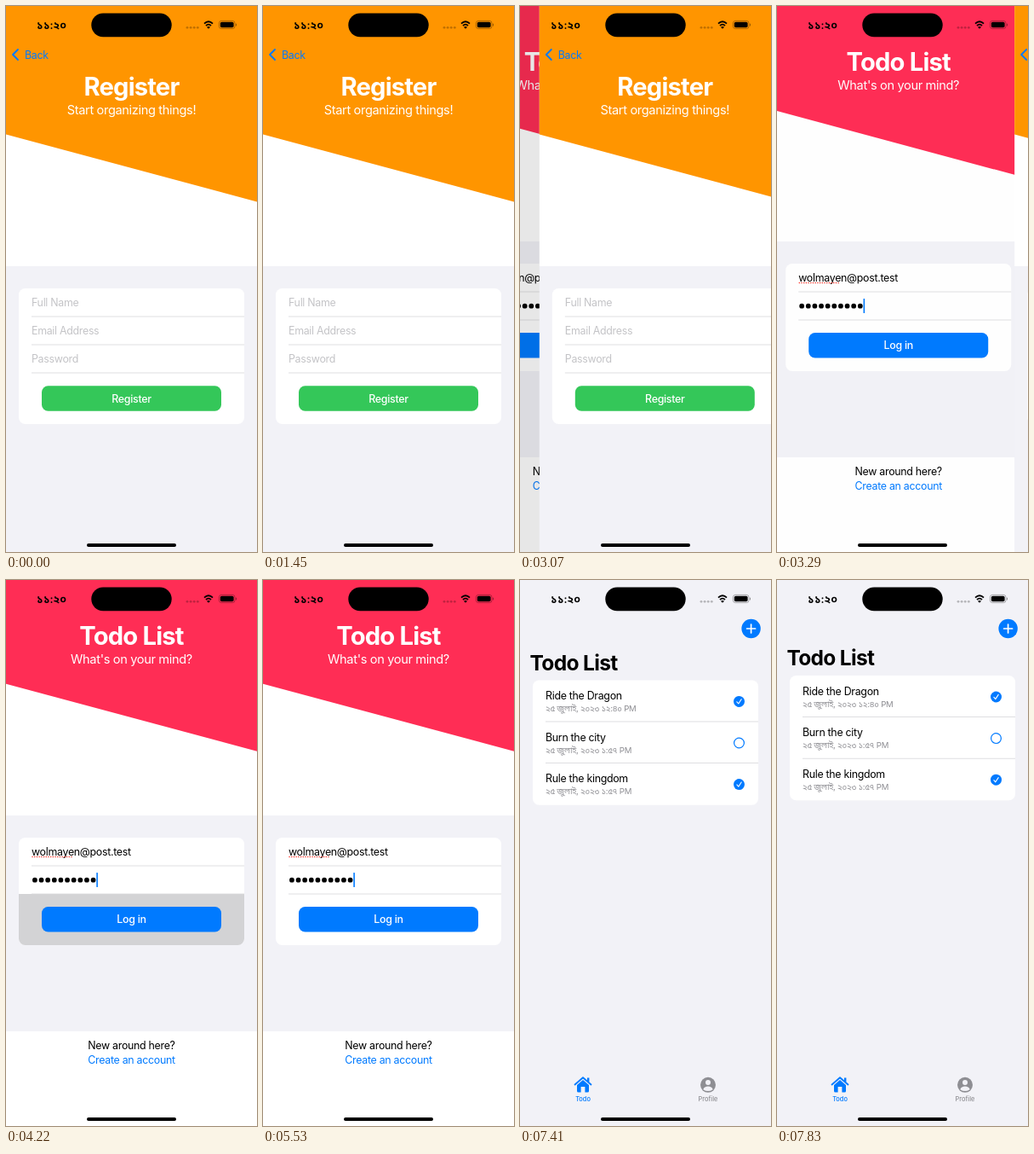
Write an HTML page that moves like this. It is 295x640 px and loops after 8000 ms.

```html
<!DOCTYPE html>
<html lang="en">
<head>
<meta charset="utf-8">
<title>Todo app</title>
<style>
  html, body { margin: 0; width: 100%; height: 100%; overflow: hidden; background: #f2f2f7; }
  svg { display: block; width: 295px; height: 640px; }
  text { font: 400 12.4px Inter, "Noto Sans Bengali", "Noto Sans", sans-serif; letter-spacing: -.024em; }
  .mid { text-anchor: middle; }
  .hero { font-size: 29.2px; font-weight: 700; letter-spacing: -.028em; }
  .sub { font-size: 14.6px; }
  .large { font-size: 24.5px; font-weight: 700; letter-spacing: -.028em; }
  .strong { font-weight: 500; }
  .date { font-size: 9.6px; }
  .tab { font-size: 7.4px; font-weight: 500; letter-spacing: 0; }
  .clock { font-size: 12.6px; font-weight: 600; letter-spacing: 0; }
</style>
</head>
<body>
<svg id="stage" viewBox="0 0 295 640"></svg>
<script>
const BLUE = '#007aff', GRAY = '#8e8e93', PALE = '#f2f2f7';
const LOOP = 8000;

const rect = (x, y, w, h, fill, r = 0, more = '') =>
  `<rect x="${x}" y="${y}" width="${w}" height="${h}" rx="${r}" fill="${fill}" ${more}/>`;
const text = (x, y, str, fill = '#000', cls = '') =>
  `<text x="${x}" y="${y}" fill="${fill}" class="${cls}">${str}</text>`;
const circle = (x, y, r, fill, more = '') =>
  `<circle cx="${x}" cy="${y}" r="${r}" fill="${fill}" ${more}/>`;
const line = (d, color, width, more = '') =>
  `<path d="${d}" fill="none" stroke="${color}" stroke-width="${width}" stroke-linecap="round" stroke-linejoin="round" ${more}/>`;
const divider = y => rect(30, y - .4, 250, .8, '#d6d6da');

const header = (color, edge, y, title, subtitle) =>
  `<path d="M0 0H295V${edge + 79}L0 ${edge}Z" fill="${color}"/>` +
  text(147.5, y, title, '#fff', 'hero mid') +
  text(147.5, y + 21.5, subtitle, '#fff', 'sub mid');

const button = (y, color, label) =>
  rect(42, y, 211, 29.5, color, 7.5) + text(147.5, y + 19.3, label, '#fff', 'strong mid');

function registerPage() {
  const fields = ['Full Name', 'Email Address', 'Password'];
  return rect(0, 0, 295, 305, '#fff') + rect(0, 305, 295, 335, PALE) +
    header('#ff9500', 150.5, 105, 'Register', 'Start organizing things!') +
    `<g id="back">${line('M14 51L8 57L14 63', BLUE, 1.8)}${text(22, 61.5, 'Back', BLUE)}</g>` +
    rect(15, 331, 265, 159, '#fff', 7.5) +
    fields.map((label, i) => text(30, 352.3 + 33 * i, label, '#c4c4c7') + divider(364 + 33 * i)).join('') +
    button(445.3, '#34c759', 'Register');
}

function loginPage() {
  const bullets = Array.from({ length: 10 }, (_, i) => circle(33.9 + 7.63 * i, 351.7, 2.9, '#000')).join('');
  return rect(0, 0, 295, 640, '#fff') + rect(0, 276, 295, 253, PALE) +
    header('#ff2d55', 121.8, 76, 'Todo List', 'What\'s on your mind?') +
    rect(15, 302, 265, 126, '#fff', 7.5) +
    '<path id="press" d="M15 368H280V420.5a7.5 7.5 0 0 1-7.5 7.5H22.5a7.5 7.5 0 0 1-7.5-7.5Z" fill="#d3d3d5"/>' +
    text(30, 323.3, 'wolmayen@post.test') +
    line('M31 324.5H79', '#ff3b30', 1.5, 'stroke-dasharray="0.1 2.6"') +
    divider(335) + divider(368) + bullets +
    rect(106.3, 343, 1.6, 17, BLUE, .6, 'id="caret"') +
    button(383, BLUE, 'Log in') +
    text(147.5, 549.5, 'New around here?', '#000', 'mid') +
    text(147.5, 566.7, 'Create an account', BLUE, 'mid');
}

function todoPage() {
  const tasks = [
    ['Ride the Dragon', '১২:৪০', true],
    ['Burn the city', '১:৫৭', false],
    ['Rule the kingdom', '১:৫৭', true],
  ];
  const row = ([name, time, done], i) => {
    const y = 112 + 48.6 * i;
    const mark = done
      ? circle(257.5, y + 25, 6.5, BLUE) + line(`M254.9 ${y + 25.4}l1.9 2.2l3.4-5.2`, '#fff', 1.1)
      : circle(257.5, y + 25, 5.9, 'none', `stroke="${BLUE}" stroke-width="1.2"`);
    return (i ? divider(y) : '') + text(30, y + 22.6, name) +
      text(30, y + 36.8, `২৫ জুলাই, ২০২৩ ${time} PM`, GRAY, 'date') + mark;
  };
  return rect(0, 0, 295, 640, PALE) +
    circle(271.6, 57, 11.2, BLUE) + line('M266.6 57h10M271.6 52v10', '#fff', 1.7) +
    `<g id="title">${text(0, 0, 'Todo List', '#000', 'large')}</g>` +
    `<g id="list">${rect(15, 112, 265, 146.3, '#fff', 7.5)}${tasks.map(row).join('')}</g>` +
    line('M64.5 591.5L74 583.3L83.5 591.5', BLUE, 1.8) + rect(79, 583.5, 2.4, 5, BLUE) +
    `<path d="M67 592L74 586L81 592V599a1.5 1.5 0 0 1-1.5 1.5H76.4V594H71.6V600.5H68.5a1.5 1.5 0 0 1-1.5-1.5Z" fill="${BLUE}"/>` +
    text(74, 611.3, 'Todo', BLUE, 'tab mid') +
    circle(221, 591.8, 9, GRAY) + circle(221, 588.9, 3, PALE) +
    `<path d="M215.3 597.2C216.5 592.3 225.5 592.3 226.7 597.2Q221 601 215.3 597.2Z" fill="${PALE}"/>` +
    text(221, 611.3, 'Profile', GRAY, 'tab mid');
}

function systemBars() {
  const dots = [0, 1, 2, 3].map(i => circle(213 + 4.1 * i, 25.3, 1.4, '#000', 'opacity=".25"')).join('');
  return text(53.5, 26.6, '১১:২০', '#000', 'clock mid') +
    rect(100.3, 8.5, 94.4, 27.7, '#000', 13.85) + dots +
    line('M233 20.6Q238 15.9 243 20.6M235 23Q238 20.2 241 23', '#000', 1.8, 'style="stroke-linecap:butt"') +
    '<path d="M238 26.8L236 24.7Q238 23.2 240 24.7Z"/>' +
    rect(250.4, 17.4, 18.6, 9.2, 'none', 2.8, 'stroke="#000" stroke-opacity=".38" stroke-width=".8"') +
    rect(251.8, 18.8, 15.8, 6.4, '#000', 1.7) +
    rect(270, 20.5, 1, 3, '#000', .5, 'opacity=".4"') +
    rect(95, 630, 105, 4, '#000', 2);
}

const group = (id, body) => `<g id="${id}">${body}</g>`;
document.getElementById('stage').innerHTML =
  group('login', loginPage()) + rect(0, 0, 295, 640, '#000', 0, 'id="dim"') +
  group('register', registerPage()) + group('todo', todoPage()) + systemBars();

const el = Object.fromEntries([...document.querySelectorAll('[id]')].map(node => [node.id, node]));
const move = (node, x, y = 0, scale = 1) => node.setAttribute('transform', `translate(${x} ${y}) scale(${scale})`);
const show = (node, alpha) => { node.style.opacity = alpha; };

// Remaining distance of a critically damped spring after ms.
const spring = (ms, omega) => {
  const k = Math.max(0, ms) / 1000 * omega;
  return (1 + k) * Math.exp(-k);
};
// Value of the last [time, value] step reached.
const stepAt = (steps, t) => steps.reduce((value, [at, next]) => t >= at ? next : value, steps[0][1]);

const POP = [0, 2950, 3060, 3170, 3290, 3400, 3510].map(at => [at, spring(at - 3035, 18.26)]).concat([[3620, 0]]);
const PULL = [6970, 7080, 7190, 7300, 7410, 7520, 7630, 7730].map(at => [at, 26 * spring(at - 6970, 6.7)]).concat([[7830, 0]]);
const BACK = [[0, 1], [2840, .25], [3060, 1]];
const PRESS = [[0, 0], [4110, 1], [4330, .45], [4440, 0]];
const CARET = [[0, 1], [3900, .5], [4010, 0], [4220, 1], [4750, .5], [4990, .2], [5110, 0], [5530, 1]];

function draw(t) {
  const left = stepAt(POP, t), pull = stepAt(PULL, t);
  move(el.register, 295 * (1 - left));
  move(el.login, -88.5 * left);
  show(el.dim, .1 * left);
  show(el.back, stepAt(BACK, t));
  show(el.press, stepAt(PRESS, t));
  show(el.caret, stepAt(CARET, t));
  el.todo.style.display = t >= 6970 ? '' : 'none';
  move(el.list, 0, pull);
  move(el.title, 11.5, 100.3 + pull, 1 + pull * .0008);
}

let start;
function tick(now) {
  start ??= now;
  draw((now - start) % LOOP);
  requestAnimationFrame(tick);
}
draw(0);
requestAnimationFrame(tick);
</script>
</body>
</html>
```
